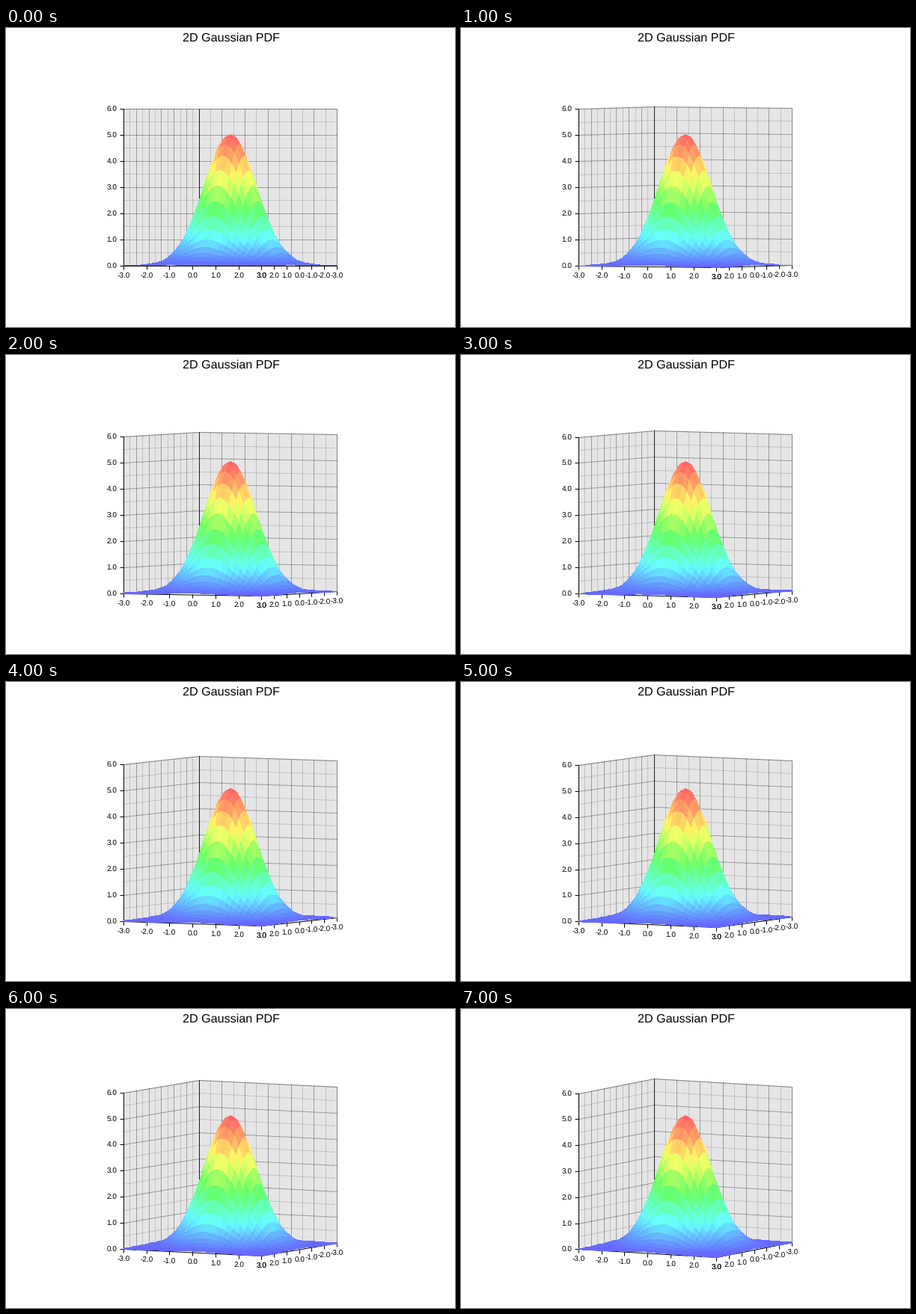
Animation, 600 px wide and 400 px high, one loop 8 s. Source, as a matplotlib script:

```python
import colorsys
import math

import numpy as np
import matplotlib.pyplot as plt
from matplotlib.animation import FuncAnimation
from matplotlib.collections import LineCollection, PolyCollection

W, H, DPI = 600, 400, 100
PX = 72 / DPI                 # one pixel in points
CX, CY, UNIT = 300, 213, 35   # cube centre and pixels per axis unit
YAW, PITCH_STEP = 0.5, 0.0152

plt.rcParams["text.hinting"] = "none"
fig = plt.figure(figsize=(W / DPI, H / DPI), dpi=DPI, facecolor="white")
ax = fig.add_axes([0, 0, 1, 1])


def project(pitch, x, y, z):
    """Orthographic view, snapped to pixel centres; z points up."""
    across = math.cos(YAW) * x - math.sin(YAW) * y
    depth = math.sin(YAW) * x + math.cos(YAW) * y
    px = CX + UNIT * across
    py = CY - UNIT * (z - 3) * math.cos(pitch) + UNIT * depth * math.sin(pitch)
    return math.floor(px + 1e-6) + 0.5, math.floor(py + 1e-6) + 0.5


def pdf(x, y):
    return 5 * math.exp(-(x * x + y * y) / 2)


def surface_cells():
    """Quads of the bell, sorted from back to front, with their colours."""
    grid = np.arange(-15, 16) / 5
    cells = []
    for x0, x1 in zip(grid, grid[1:]):
        for y0, y1 in zip(grid, grid[1:]):
            corners = [(x, y, pdf(x, y))
                       for x, y in ((x0, y0), (x1, y0), (x1, y1), (x0, y1))]
            hue = (1 - corners[0][2] / 5) * 2 / 3
            depth = math.sin(YAW) * (x0 + x1) + math.cos(YAW) * (y0 + y1)
            cells.append((depth, corners, colorsys.hls_to_rgb(hue, 0.7, 1)))
    cells.sort(key=lambda cell: cell[0])
    return cells


CELLS = surface_cells()


def add_lines(segments, alpha, z):
    ax.add_collection(LineCollection(
        segments, colors=[(0, 0, 0, alpha)], linewidths=PX, zorder=z, snap=False))


def label(x, y, text, align, size=10):
    ax.text(x, y, text, ha=align, va="baseline", fontsize=size * PX,
            family="Liberation Sans", color="black")


def draw_walls(at):
    walls = [
        lambda u, z: at(-3, u, z),
        lambda u, z: at(u, -3, z),
    ]
    for wall in walls:
        quad = [wall(-3, 0), wall(3, 0), wall(3, 6), wall(-3, 6)]
        ax.add_collection(PolyCollection(
            [quad], facecolors="#e5e5e5", edgecolors="none", zorder=1, snap=False))
        for step, alpha, z in ((0.5, 0.15, 2), (1, 0.2, 3)):
            ticks = np.arange(0, 6 + step / 2, step)
            add_lines([(wall(t - 3, 0), wall(t - 3, 6)) for t in ticks], alpha, z)
            add_lines([(wall(-3, t), wall(3, t)) for t in ticks], alpha, z)
        add_lines([quad + quad[:1]], 0.2, 3)
    add_lines([(at(-3, -3, 0), at(-3, -3, 6))], 0.6, 3)


def draw_axes(at):
    lines = [
        (at(-3, 3, 0), at(-3, 3, 6)),
        (at(-3, 3, 0), at(3, 3, 0)),
        (at(3, 3, 0), at(3, -3, 0)),
    ]
    for t in range(7):
        x, y = at(-3, 3, t)
        lines.append(((x, y), (x - 5, y)))
        label(x - 9, y + 3.5, f"{t:.1f}", "right")
        for x, y in (at(t - 3, 3, 0), at(3, t - 3, 0)):
            lines.append(((x, y), (x, y + 5)))
            label(x, y + 16.5, f"{t - 3:.1f}", "center")
    add_lines(lines, 1, 4)


def draw_surface(at):
    quads, widths = [], []
    for _, corners, _ in CELLS:
        quad = np.array([at(*corner) for corner in corners])
        w, h = np.ptp(quad, axis=0)
        flat = w == 0 or h == 0
        # A flat quad is a line; others fill whole pixels across their short side.
        if not flat:
            quad[:, 1 if w > h else 0] -= 0.5
        quads.append(quad)
        widths.append(PX if flat else 0.4 * PX)
    ax.add_collection(PolyCollection(
        quads, facecolors=[color for *_, color in CELLS], edgecolors="face",
        linewidths=widths, antialiaseds=False, zorder=5, snap=False))


def draw(frame):
    ax.cla()
    ax.set(xlim=(0, W), ylim=(H, 0))
    ax.axis("off")
    pitch = frame * PITCH_STEP

    def at(x, y, z):
        return project(pitch, x, y, z)

    draw_walls(at)
    draw_axes(at)
    draw_surface(at)
    label(300.5, 18, "2D Gaussian PDF", "center", 16.13)
    return []


anim = FuncAnimation(fig, draw, frames=8, interval=1000, repeat=True,
                     init_func=lambda: [], blit=False)
plt.show()
```
